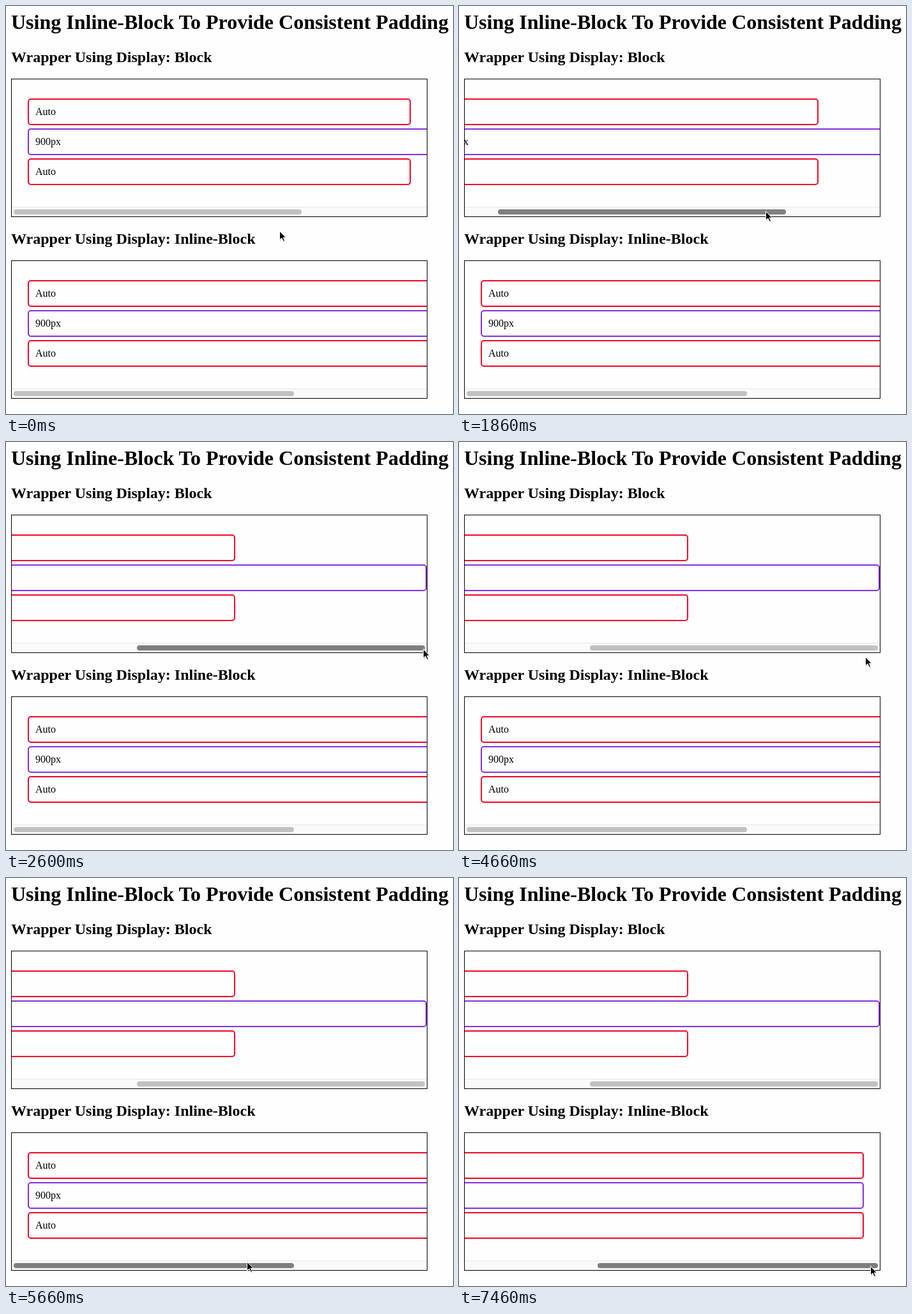
Animation of 700 by 640 pixels, one loop 8000 ms. Source, as an HTML page:

```html
<!DOCTYPE html>
<html lang="en">
<head>
<meta charset="utf-8">
<title>Inline-block padding</title>
<style>
  html, body { margin: 0; width: 100%; height: 100%; overflow: hidden; background: #fefefe; }
  svg { display: block; }
  text { font: 16px "Liberation Serif", "Times New Roman", serif; fill: #000; }
  .h1 { font-size: 32px; font-weight: bold; }
  .h2 { font-size: 24px; font-weight: bold; }
</style>
</head>
<body>
<svg id="stage" width="700" height="640" viewBox="0 0 700 640">
  <text class="h1" x="8" y="36">Using Inline-Block To Provide Consistent Padding</text>
  <text class="h2" x="8" y="88">Wrapper Using Display: Block</text>
  <text class="h2" x="8" y="373">Wrapper Using Display: Inline-Block</text>
  <g id="panels"></g>
  <g id="cursor">
    <path d="M1 2V17.5L4.5 14.2L6.8 19L9.4 18L7.3 13H11.5Z" fill="#000" opacity=".14"/>
    <path d="M0 0V16.2L3.7 12.8L6.2 18L9.1 16.8L6.8 11.8H11.4Z" fill="#fff"/>
    <path d="M1 2.2V14L3.9 11.2L6.7 16.8L8 16.2L5.5 10.8H9.4Z" fill="#000"/>
  </g>
</svg>
<script>
const NS = "http://www.w3.org/2000/svg";
const LOOP = 8000, STEP = 1000 / 15;
const RED = "#f2062a", PURPLE = "#8430dc";

function add(parent, tag, attrs, text) {
  const el = document.createElementNS(NS, tag);
  for (const k in attrs) el.setAttribute(k, attrs[k]);
  if (text) el.textContent = text;
  return parent.appendChild(el);
}

// grab: pointer x at which the thumb starts to follow
function makePanel(top, autoWidth, thumbWidth, maxScroll, grab) {
  const root = document.getElementById("panels");
  const view = add(root, "svg", { x: 9, y: top + 1, width: 650, height: 215, overflow: "hidden" });
  const content = add(view, "g", {});
  [["Auto", autoWidth, RED], ["900px", 900, PURPLE], ["Auto", autoWidth, RED]].forEach(([label, w, color], i) => {
    const y = 30 + 47 * i;
    add(content, "rect", { x: 26, y: y + 1, width: w - 2, height: 40, rx: 4, fill: "none", stroke: color, "stroke-width": 2 });
    add(content, "text", { x: 37, y: y + 26 }, label);
  });
  add(view, "rect", { x: 0, y: 200, width: 650, height: 15, fill: "#fafafd" });
  add(view, "rect", { x: 0, y: 200, width: 650, height: 1, fill: "#e7e7e9" });
  const thumb = add(view, "rect", { y: 204, width: thumbWidth, height: 8, rx: 4 });
  add(root, "rect", { x: 8.5, y: top + 0.5, width: 651, height: 216, fill: "none", stroke: "#000" });

  const travel = 644 - thumbWidth;
  return (x, y, from, n) => {
    const pos = n < from ? 0 : Math.min(travel, Math.max(0, x - grab));
    const hot = y >= top + 201 && y < top + 216;
    content.setAttribute("transform", `translate(${-Math.round(pos * maxScroll / travel)} 0)`);
    thumb.setAttribute("x", 3 + Math.floor(pos));
    thumb.setAttribute("fill", hot ? "#7f7f7f" : "#c1c1c3");
  };
}

const block = makePanel(114, 600, 451, 275, 430.2);
const inline = makePanel(399, 900, 439, 300, 386.8);
const cursor = document.getElementById("cursor");

// pointer path: step, x, y
const path = [
  [0, 428, 352], [5, 428, 352], [15, 430, 321], [25, 430, 321], [28, 480, 321],
  [38, 648, 324], [39, 653, 324], [69, 653, 324], [70, 636, 336], [82, 385, 587],
  [85, 377, 601], [94, 377, 601], [99, 448, 601], [107, 595, 605], [112, 644, 608], [120, 644, 608]
];

const slope = (i, c) => (path[i + 1][c] - path[i][c]) / (path[i + 1][0] - path[i][0]);

function tangent(i, c) {
  if (i === 0 || i === path.length - 1) return 0;
  const a = slope(i - 1, c), b = slope(i, c);
  return a * b > 0 ? 2 * a * b / (a + b) : 0;
}

// monotone cubic through the path points
function along(n, c) {
  let i = 0;
  while (i < path.length - 2 && n >= path[i + 1][0]) i++;
  const h = path[i + 1][0] - path[i][0], u = (n - path[i][0]) / h;
  const s = u * u * (3 - 2 * u);
  return path[i][c] * (1 - s) + path[i + 1][c] * s
    + h * u * (1 - u) * ((1 - u) * tangent(i, c) - u * tangent(i + 1, c));
}

function draw(ms) {
  const n = Math.floor((ms % LOOP + 8) / STEP) % 120;
  const x = Math.round(along(n, 1)), y = Math.round(along(n, 2));
  const held = Math.min(n, 39);
  block(Math.round(along(held, 1)), y, 25, n);
  inline(x, y, 94, n);
  cursor.setAttribute("transform", `translate(${x} ${y})`);
}

const start = performance.now();
function tick(now) {
  draw(Math.max(0, now - start));
  requestAnimationFrame(tick);
}
draw(0);
requestAnimationFrame(tick);
</script>
</body>
</html>
```
